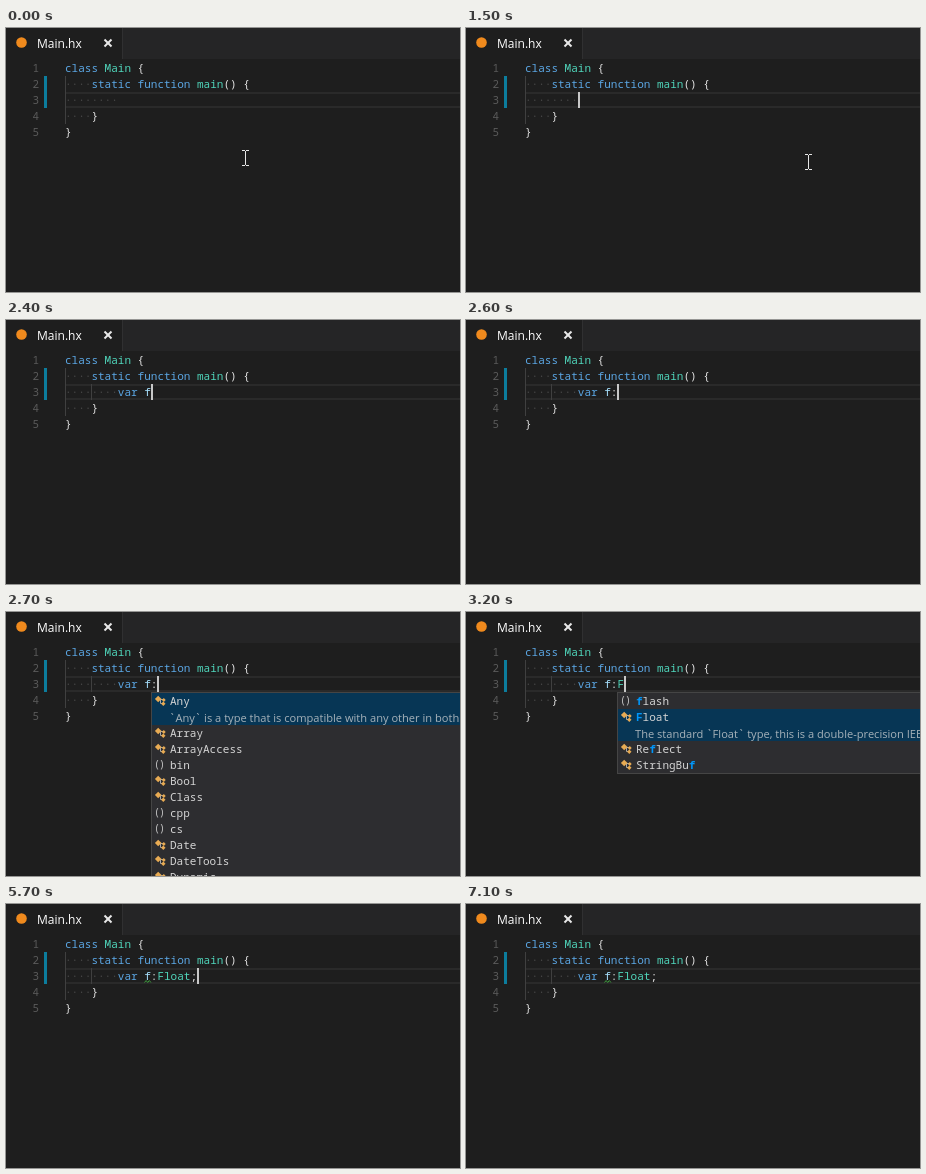
An HTML page with a canvas for the animation above (7.5 s loop, 454 by 264 pixels).

```html
<!DOCTYPE html>
<html lang="en">
<head>
<meta charset="utf-8">
<title>Code completion</title>
<style>
  html, body { margin: 0; width: 454px; height: 264px; overflow: hidden; background: #1e1e1e; }
  canvas { display: block; }
</style>
</head>
<body>
<canvas id="stage" width="454" height="264"></canvas>
<script>
const W = 454, H = 264, LOOP = 7500;
const LEFT = 59, CHAR = 6.6, ROW = 16, TOP = 32;
const MONO = '11px "Noto Sans Mono", monospace';
const BLUE = '#5ba6e3', TEAL = '#4fd3b9', PLAIN = '#e2e2e2', NAME = '#a8e2ff';
const ctx = document.getElementById('stage').getContext('2d', { alpha: false });

const colX = col => LEFT + CHAR * col;
const rowY = row => TOP + ROW * (row - 1);

function rect(x, y, w, h, color) {
  ctx.fillStyle = color;
  ctx.fillRect(x, y, w, h);
}

function text(str, x, y, color, font = MONO) {
  ctx.font = font;
  ctx.fillStyle = color;
  ctx.fillText(str, x, y);
}

function stroke(points, color, width = 1) {
  ctx.strokeStyle = color;
  ctx.lineWidth = width;
  ctx.beginPath();
  points.forEach(([x, y], i) => i ? ctx.lineTo(x, y) : ctx.moveTo(x, y));
  ctx.stroke();
}

// Tokens are [string, color] pairs placed on the character grid.
function code(row, col, tokens) {
  for (const [str, color] of tokens) {
    text(str, colX(col), rowY(row) + 12, color, '500 ' + MONO);
    col += str.length;
  }
}

const ALL = ['Any', 'Array', 'ArrayAccess', 'bin', 'Bool', 'Class', 'cpp', 'cs', 'Date', 'DateTools', 'Dynamic'];
const WITH_F = ['flash', 'Float', 'Reflect', 'StringBuf'];
const WITH_V = ['EnumValue', 'java', 'ValueType', 'Void'];
const PACKAGES = ['bin', 'cpp', 'cs', 'flash', 'java'];
const DOCS = {
  Any: '`Any` is a type that is compatible with any other in both ways.',
  Float: 'The standard `Float` type, this is a double-precision IEEE 64bit float.',
  EnumValue: 'An abstract type that represents any enum value. See `Type` for more.'
};

// Each entry: start time, items, selected index, left edge, matched letters.
const POPUPS = [
  [1900, WITH_V, 0, 112, 'v'],
  [2000, WITH_V, 0, 118, 'v'],
  [2100, WITH_V.slice(0, 3), 0, 125, 'va'],
  [2200],
  [2500, WITH_F, 1, 138, 'f'],
  [2600],
  [2700, ALL, 0, 145, ''],
  [2800, ALL, 0, 151, ''],
  [3200, WITH_F, 1, 151, 'f'],
  [3300, WITH_F, 1, 158, 'f'],
  [4000]
];

const TYPED = [
  [0, ''], [1800, 'v'], [2000, 'va'], [2100, 'var'], [2400, 'var f'],
  [2600, 'var f:'], [3100, 'var f:F'], [4000, 'var f:Float'], [4600, 'var f:Float;']
];

const CARET = [
  [0, false], [200, true], [3700, false], [4000, true], [4500, false],
  [4600, true], [5100, false], [5600, true], [6100, false], [6600, true], [7100, false]
];

// Last entry whose start time has passed.
const at = (list, t) => list.filter(entry => entry[0] <= t).pop();

function mousePos(t) {
  if (t >= 1600) return null;
  if (t >= 1500) return [342, 134];
  const ease = p => p * p * (3 - 2 * p);
  if (t < 800) {
    const p = ease(t / 800);
    return [239 - 2 * p, 130 - 42 * p];
  }
  const p = ease(Math.min(1, (t - 800) / 400));
  return [237 - p, 88 - 13 * p];
}

function drawTabs() {
  rect(0, 0, W, 31, '#252526');
  rect(0, 0, 116, 31, '#1e1e1e');
  rect(116, 0, 1, 31, '#303031');
  ctx.fillStyle = '#f08a1d';
  ctx.beginPath();
  ctx.arc(15.5, 14.5, 5.3, 0, Math.PI * 2);
  ctx.fill();
  text('Main.hx', 31, 20, '#ffffff', '12px "Open Sans", sans-serif');
  stroke([[98.5, 11.5], [105.5, 18.5]], '#e8e8e8', 2);
  stroke([[105.5, 11.5], [98.5, 18.5]], '#e8e8e8', 2);
}

function drawEditor(typed, onBrace) {
  const y = rowY(onBrace ? 4 : 3);
  rect(LEFT, y, W - LEFT, 2, '#2a2a2a');
  rect(LEFT, y + 14, W - LEFT, 2, '#2a2a2a');

  for (let n = 1; n <= 5; n++) text(String(n), 26.5, rowY(n) + 12, '#5a5a5a');
  rect(38, 48, 3, 32, '#0c7d9d');
  rect(LEFT, 48, 1, 48, '#404040');
  if (typed) rect(85, 64, 1, 16, '#404040');

  [[2, 4], [3, 8], [4, 4]].forEach(([row, count]) => code(row, 0, [['·'.repeat(count), '#484848']]));
  code(1, 0, [['class ', BLUE], ['Main', TEAL], [' {', PLAIN]]);
  code(2, 4, [['static function ', BLUE], ['main', TEAL], ['() {', PLAIN]]);
  code(4, 4, [['}', PLAIN]]);
  code(5, 0, [['}', PLAIN]]);

  const type = typed.slice(6).replace(';', '');
  code(3, 8, [
    [typed.slice(0, 4), typed.length < 3 ? PLAIN : BLUE],
    [typed.slice(4, 5), NAME],
    [typed.slice(5, 6), PLAIN],
    [type, TEAL],
    [typed.slice(11), PLAIN]
  ]);

  if (onBrace) {
    for (const [row, col] of [[2, 27], [4, 4]]) {
      ctx.strokeStyle = '#888888';
      ctx.lineWidth = 1;
      ctx.strokeRect(Math.round(colX(col)) + 0.5, rowY(row) + 0.5, 6, 15);
    }
  }
}

function drawSquiggle() {
  const points = [];
  for (let i = 0; i < 5; i++) points.push([138.5 + i * 1.6, i % 2 ? 76.5 : 78.5]);
  stroke(points, '#3c9a3c');
}

function drawIcon(name, x, y) {
  if (PACKAGES.includes(name)) {
    const font = '10px "Noto Sans Mono", monospace';
    text('(', x - 1, y + 11, '#c5c5c5', font);
    text(')', x + 4, y + 11, '#c5c5c5', font);
    return;
  }
  const diamond = (cx, cy, r) => {
    ctx.fillStyle = '#e8ab53';
    ctx.beginPath();
    ctx.moveTo(cx - r, cy);
    ctx.lineTo(cx, cy - r);
    ctx.lineTo(cx + r, cy);
    ctx.lineTo(cx, cy + r);
    ctx.fill();
  };
  stroke([[x + 4, y + 6.5], [x + 8, y + 6.5]], '#a8a8a8');
  stroke([[x + 5.5, y + 6.5], [x + 5.5, y + 10.5], [x + 8, y + 10.5]], '#a8a8a8');
  diamond(x + 3.2, y + 6, 3.3);
  diamond(x + 8.8, y + 7, 1.9);
  diamond(x + 8.3, y + 10.8, 2.2);
}

function drawLabel(name, x, y, match) {
  const color = '#d4d4d4';
  const start = match ? name.toLowerCase().indexOf(match) : -1;
  if (start < 0) return text(name, x, y, color);
  const end = start + match.length;
  text(name.slice(0, start), x, y, color);
  text(name.slice(start, end), x + start * CHAR, y, '#0097fb', 'bold ' + MONO);
  text(name.slice(end), x + end * CHAR, y, color);
}

function drawPopup([, items, selected, left, match]) {
  const height = ROW * (items.length + 1) + 2;
  rect(left, 80, W, height, '#454545');
  rect(left + 1, 81, W, height - 2, '#2d2d30');
  let y = 81;
  items.forEach((name, i) => {
    if (i === selected) rect(left + 1, y, W, ROW * 2, '#073655');
    drawIcon(name, left + 4, y);
    drawLabel(name, left + 19, y + 12, match);
    y += ROW;
    if (i === selected) {
      text(DOCS[name], left + 18, y + 13, '#a6b2ba', '11.1px "Open Sans", sans-serif');
      y += ROW;
    }
  });
}

function drawMouse([mx, my]) {
  const x = Math.round(mx), y = Math.round(my);
  const color = '#e6e6e6';
  rect(x, y - 7, 1, 14, color);
  for (const edge of [y - 8, y + 7]) {
    rect(x - 3, edge, 3, 1, color);
    rect(x + 1, edge, 3, 1, color);
  }
}

function draw(t) {
  const typed = at(TYPED, t)[1];
  const onBrace = t >= 700 && t < 1200;
  const popup = at(POPUPS, t);
  const mouse = mousePos(t);

  rect(0, 0, W, H, '#1e1e1e');
  drawTabs();
  drawEditor(typed, onBrace);
  if (t >= 5700) drawSquiggle();
  if (at(CARET, t)[1]) {
    const col = onBrace ? 5 : 8 + typed.length;
    rect(Math.round(colX(col)), rowY(onBrace ? 4 : 3), 2, ROW, '#c8c8c8');
  }
  if (popup && popup[1]) drawPopup(popup);
  if (mouse) drawMouse(mouse);
}

const begin = performance.now();
function tick() {
  const t = (performance.now() - begin) % LOOP;
  draw(Math.floor(t / 100) * 100);
  requestAnimationFrame(tick);
}
tick();
</script>
</body>
</html>
```
